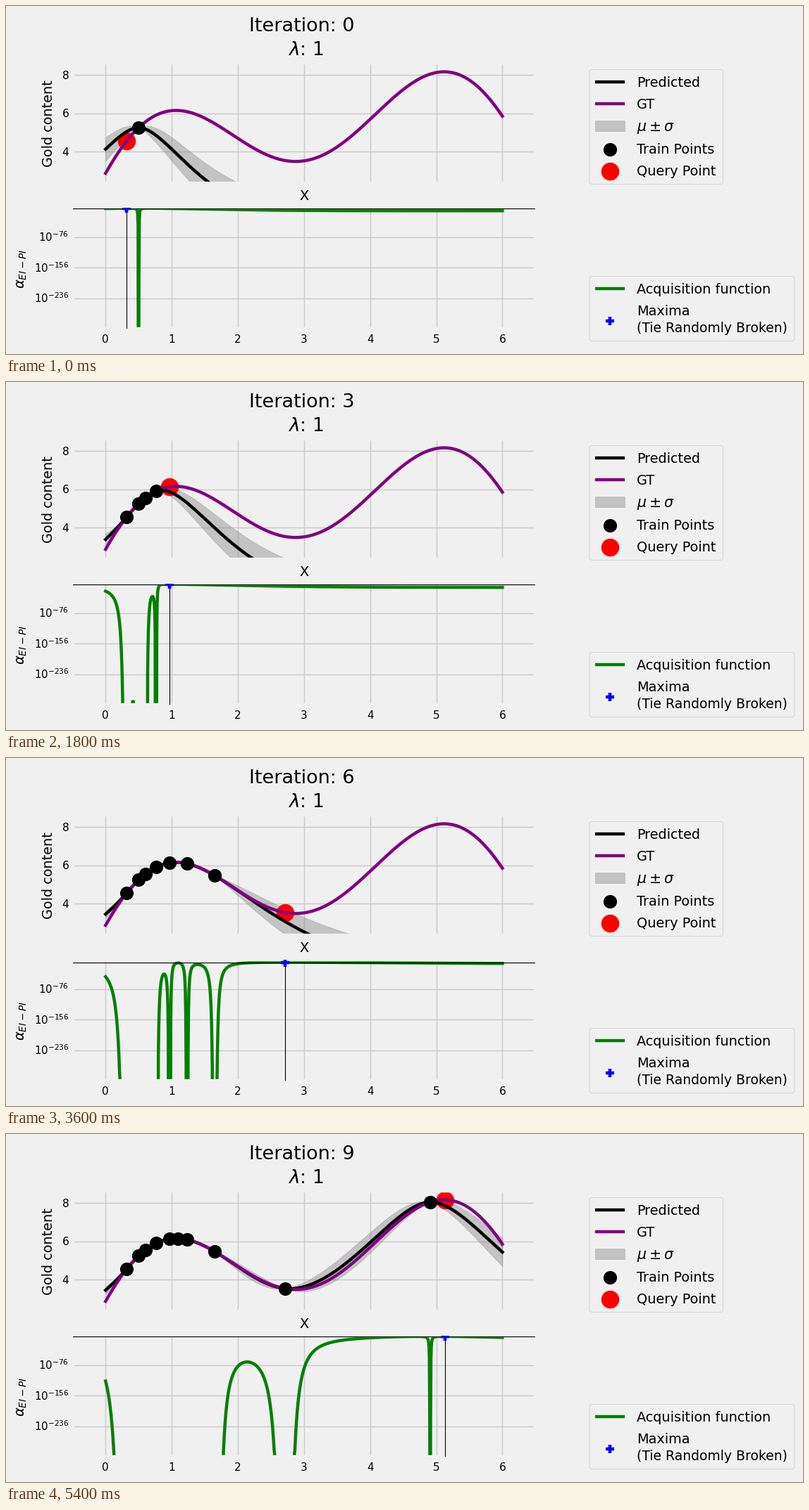
A matplotlib script for the animation above (6 s loop, 1131 by 495 pixels).

```python
import math

import matplotlib.pyplot as plt
import numpy as np
from matplotlib.animation import FuncAnimation
from matplotlib.patches import FancyBboxPatch, Rectangle

W, H = 1131, 495
BG, GRID = "#f0f0f0", "#cbcbcb"
LEFT, RIGHT = 95, 751
X0, X_UNIT = 141.3, 93.85          # pixel of x = 0 and pixels per unit
THICK, THIN = 4.46, 1.12
TRAIN_SIZE, QUERY_SIZE = 19.2, 25.5
EPS, LAMBDA = 0.2, 1

plt.rcParams["font.family"] = "DejaVu Sans"
plt.rcParams["mathtext.fontset"] = "dejavusans"

SAMPLES = np.array([0.5, 0.316, 0.605, 0.764, 0.967, 1.232,
                    1.65, 2.714, 1.094, 4.908, 5.131])
STEPS = len(SAMPLES) - 1
xs = np.linspace(0, 6, 1001)


def truth(x):
    return 2 * (x - 3) * np.sin(x - 3) + x / 2 + 2


def matern(a, b, scale):
    s = math.sqrt(3) * np.abs(a[:, None] - b[None, :]) / scale
    return (1 + s) * np.exp(-s)


def train_cov(x, scale):
    return matern(x, x, scale) + 1e-10 * np.eye(len(x))


def neg_log_likelihood(scale, x, y):
    chol = np.linalg.cholesky(train_cov(x, scale))
    half = np.linalg.solve(chol, y)
    return half @ half / 2 + np.log(np.diag(chol)).sum()


def fit_scale(x, y):
    if len(x) == 1:
        return 1.0
    scales = np.geomspace(0.3, 5, 400)
    return min(scales, key=lambda s: neg_log_likelihood(s, x, y))


def log_acquisition(mean, sigma, best):
    gain = mean - best - EPS
    z = gain / sigma
    pi = np.array([math.erfc(-v / math.sqrt(2)) / 2 for v in z])
    pdf = np.exp(-z * z / 2) / math.sqrt(2 * math.pi)
    ei = np.maximum(gain * pi + sigma * pdf, 0)
    alpha = pi + LAMBDA * ei
    return np.where(alpha > 0, np.log10(np.maximum(alpha, 1e-307)), -1000)


def solve_step(i):
    x = SAMPLES[:i + 1]
    y = truth(x)
    scale = fit_scale(x, y)
    cross = matern(xs, x, scale)
    weights = np.linalg.solve(train_cov(x, scale), cross.T)
    mean = weights.T @ y
    variance = 1 - np.sum(cross * weights.T, axis=1)
    sigma = np.sqrt(np.maximum(variance, 1e-10))
    return mean, sigma, log_acquisition(mean, sigma, y.max())


steps = [solve_step(i) for i in range(STEPS)]

fig = plt.figure(figsize=(W / 72, H / 72), dpi=72, facecolor=BG)


def panel(top, bottom, y_ref, ref, unit, ticks):
    """Axes between two pixel rows; value ref lies on row y_ref."""
    ax = fig.add_axes([LEFT / W, 1 - bottom / H,
                       (RIGHT - LEFT) / W, (bottom - top) / H], facecolor=BG)
    ax.set_xlim((LEFT - X0) / X_UNIT, (RIGHT - X0) / X_UNIT)
    ax.set_ylim(ref - (bottom - y_ref) / unit, ref + (y_ref - top) / unit)
    ax.set_xticks(range(7))
    ax.set_yticks(ticks)
    ax.tick_params(length=0, labelbottom=False, labelleft=False)
    ax.grid(color=GRID, lw=1.49)
    ax.set_axisbelow(True)
    for spine in ax.spines.values():
        spine.set(color=BG, linewidth=THICK)
    return ax


top_ax = panel(81, 251.7, 206.75, 4, 27.1, [4, 6, 8])
low_ax = panel(286.8, 459, 328.57, -76, 0.545, [-236, -156, -76])

# Upper panel
band = top_ax.fill_between(xs, xs, xs, color="gray", alpha=0.4, lw=0.75,
                           zorder=1)
query, = top_ax.plot([], [], "o", color="red", ms=QUERY_SIZE, mew=0,
                     zorder=1.5)
predicted, = top_ax.plot([], [], color="black", lw=THICK, zorder=2)
top_ax.plot(xs, truth(xs), color="purple", lw=THICK, zorder=2.1)
train, = top_ax.plot([], [], "o", color="black", ms=TRAIN_SIZE, mew=0,
                     zorder=2.2)

# Lower panel
acquisition, = low_ax.plot([], [], color="green", lw=THICK, zorder=2)
h_line = low_ax.axhline(0, color="black", lw=THIN, zorder=3)
v_line = low_ax.axvline(0, color="black", lw=THIN, zorder=3)
maxima, = low_ax.plot([], [], "+", color="blue", ms=12.3, mew=THICK,
                      zorder=4)

# Labels and legends in pixel coordinates
page = fig.add_axes([0, 0, 1, 1])
page.set(xlim=(0, W), ylim=(H, 0))
page.axis("off")


def label(x, y, text, size=19.2, ha="left", **kw):
    kw.setdefault("va", "baseline")
    return page.text(x, y, text, size=size, ha=ha, color="black", **kw)


def legend_box(x, y, w, h):
    page.add_patch(FancyBboxPatch(
        (x + 4, y + 4), w - 8, h - 8, boxstyle="round,pad=4,rounding_size=4",
        fc=BG, ec="#d6d6d6", lw=1))


def legend_line(y, color):
    page.plot([836, 878], [y, y], color=color, lw=THICK,
              solid_capstyle="butt")


title = label(419.5, 36.5, "", 27, "center")
label(425, 69.5, r"$\lambda$: 1", 26.5, "center")
label(60, 167.5, "Gold content", 19.3, "center", va="center", rotation=90)
label(423, 276, "X", 19.3, "center")
label(23, 374, r"$\alpha_{EI-PI}$", 19.5, "center", va="center", rotation=90)
for value in (4, 6, 8):
    label(89.5, 213 - (value - 4) * 27.25, str(value), 15.5, "right")
for k, power in enumerate((-76, -156, -236)):
    label(89, 335 + 43.6 * k, rf"$\mathregular{{10^{{{power}}}}}$", 15,
          "right")
for value in range(7):
    label(X0 + X_UNIT * value, 479, str(value), 15.3, "center")

legend_box(828, 90.5, 189.5, 163)
legend_line(108, "black")
legend_line(139, "purple")
page.add_patch(Rectangle((836, 163), 42, 14.5, fc="gray", ec="gray",
                         alpha=0.4, lw=0.75))
page.plot(857, 204, "o", color="black", ms=TRAIN_SIZE, mew=0)
page.plot(857, 235, "o", color="red", ms=QUERY_SIZE, mew=0)
label(895, 115, "Predicted")
label(895, 146, "GT")
label(895, 177.5, r"$\mu \pm \sigma$", 20.5)
label(895, 210, "Train Points")
label(895, 241, "Query Point")

legend_box(828, 384.5, 291, 92)
legend_line(402, "green")
page.plot(857, 448, "+", color="blue", ms=12.3, mew=THICK)
label(895, 409, "Acquisition function")
label(895, 440, "Maxima")
label(895, 464, "(Tie Randomly Broken)", 18.8)


def update(i):
    mean, sigma, log_alpha = steps[i]
    seen, target = SAMPLES[:i + 1], SAMPLES[i + 1]
    peak = log_alpha.max()
    title.set_text(f"Iteration: {i}")
    band.set_verts([np.column_stack([
        np.r_[xs, xs[::-1]],
        np.r_[mean + sigma, (mean - sigma)[::-1]]])])
    predicted.set_data(xs, mean)
    train.set_data(seen, truth(seen))
    query.set_data([target], [truth(target)])
    acquisition.set_data(xs, log_alpha)
    h_line.set_ydata([peak, peak])
    v_line.set_xdata([target, target])
    maxima.set_data([target], [peak])
    return title, band, predicted, train, query, acquisition


anim = FuncAnimation(fig, update, frames=STEPS, interval=600, repeat=True,
                     repeat_delay=0, blit=False)
plt.show()
```
